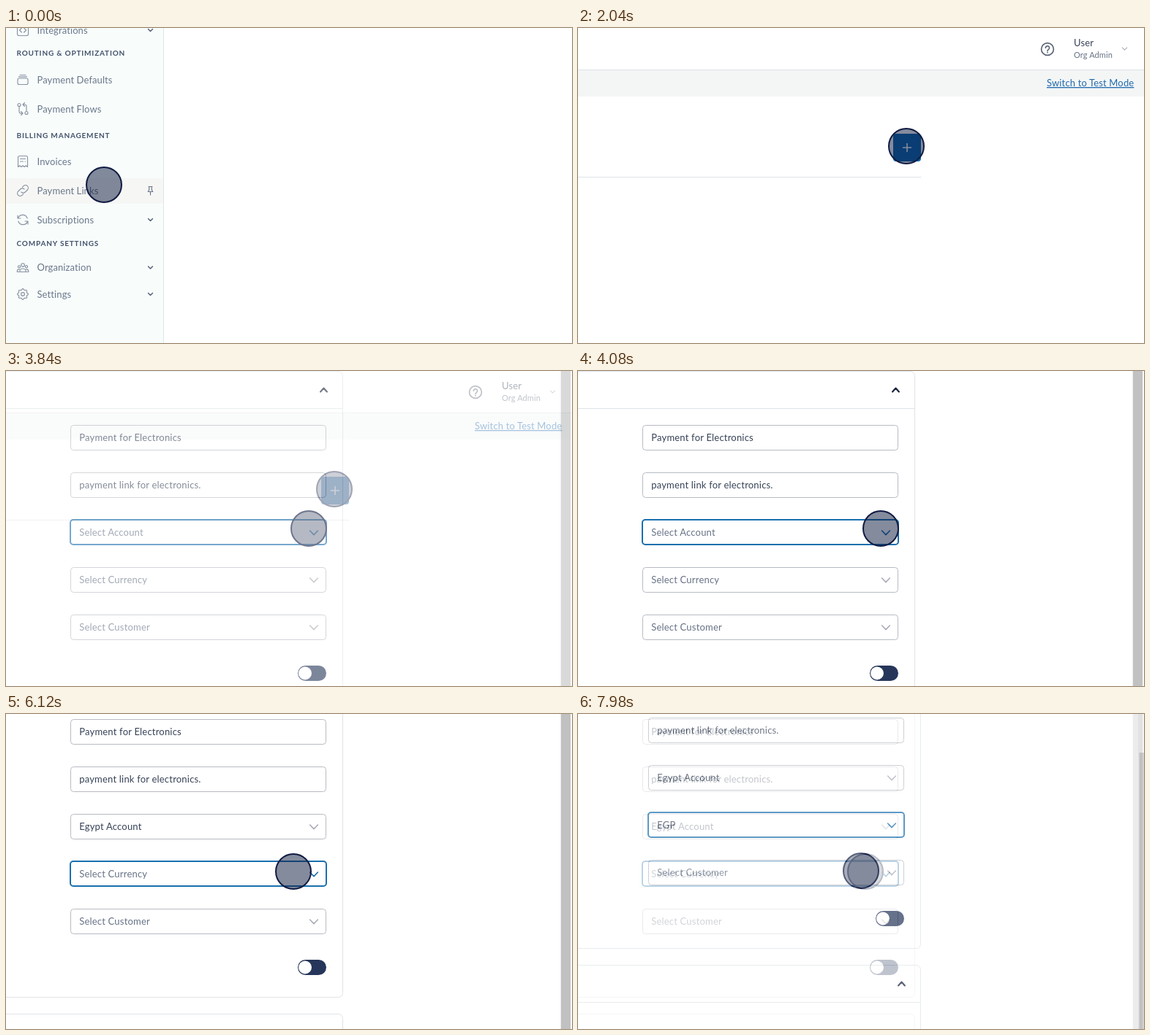
Recreate the animation shown at these times as an HTML page. Size 774x432 px, loop 8000 ms.

```html
<!DOCTYPE html>
<html lang="en">
<head>
<meta charset="utf-8">
<title>Payment link setup</title>
<style>
  html, body { margin: 0; width: 100%; height: 100%; overflow: hidden; background: #fff; }
  svg { display: block; width: 774px; height: 432px; }
  text { font: 13px Lato, "Open Sans", sans-serif; letter-spacing: .2px; fill: #667286; }
  .nav { letter-spacing: .1px; fill: #6b778a; }
  .head { font-size: 10px; font-weight: 700; letter-spacing: .82px; fill: #42516a; }
  .dark { fill: #364257; }
  .small { font-size: 11px; letter-spacing: .1px; }
  .link { fill: #1f69ad; letter-spacing: .15px; text-decoration: underline; text-underline-offset: 2px; }
  .line { fill: none; stroke-linecap: round; stroke-linejoin: round; }
</style>
</head>
<body>
<svg id="stage" viewBox="0 0 774 432"></svg>
<script>
const LOOP = 8000, STEP = 60, FADES = [1500, 3540, 5580, 7620];
const BLUE = '#1a6fae', EDGE = '#dfe3e7';

const rect = (x, y, w, h, fill, rx = 0, extra = '') =>
  `<rect x="${x}" y="${y}" width="${w}" height="${h}" fill="${fill}" rx="${rx}" ${extra}/>`;
const line = (d, color, width = 1) =>
  `<path class="line" d="${d}" stroke="${color}" stroke-width="${width}"/>`;
const text = (x, y, cls, str) => `<text x="${x}" y="${y}" class="${cls}">${str}</text>`;
const chevron = (x, y, w, h, color, width) =>
  line(`M${x - w} ${y - h / 2}l${w} ${h}l${w} ${-h}`, color, width);
const ring = (x, y, r) => `M${x - r} ${y}a${r} ${r} 0 1 0 ${2 * r} 0a${r} ${r} 0 1 0 ${-2 * r} 0`;
const pointer = (x, y) =>
  `<circle cx="${x}" cy="${y}" r="24" fill="rgb(11,25,60)" fill-opacity=".5" stroke="#101b42" stroke-width="2"/>`;

function gear(r, bump) {
  let d = '';
  for (let i = 0; i < 64; i++) {
    const a = i * Math.PI / 32, q = r + bump * Math.cos(8 * a);
    d += `${i ? 'L' : 'M'}${(q * Math.cos(a)).toFixed(2)} ${(q * Math.sin(a)).toFixed(2)}`;
  }
  return d + 'Z' + ring(0, 0, 2.4);
}

// Icon paths are centred on 0,0.
const ICONS = {
  code: 'M-5 -7.5h10q2.5 0 2.5 2.5v10q0 2.5 -2.5 2.5h-10q-2.5 0 -2.5 -2.5v-10q0 -2.5 2.5 -2.5M-1.5 -3l-3 3l3 3M1.5 -3l3 3l-3 3',
  stack: 'M-5 -2h10q2 0 2 2v4.5q0 2 -2 2h-10q-2 0 -2 -2v-4.5q0 -2 2 -2M-5.5 -4.2h11M-4 -6.5h8',
  flow: ring(-5, -5.5, 2) + ring(5, 5.5, 2) +
    'M-5 -3v6.5q0 2.5 2.5 2.5h2.5M-2.5 3.5l2.5 2.5l-2.5 2.5M5 3v-6.5q0 -2.5 -2.5 -2.5h-2.5M2.5 -3.5l-2.5 -2.5l2.5 -2.5',
  bill: 'M-6.5 7.5v-13q0 -2 2 -2h9q2 0 2 2v13l-2.2 -1.7l-2.2 1.7l-2.1 -1.7l-2.1 1.7l-2.2 -1.7zM-3.5 -3.5h7M-3.5 0h4M3 0h.5',
  chain: 'M-2 2a3.7 3.7 0 0 0 5.3 0l3 -3a3.7 3.7 0 0 0 -5.3 -5.3l-1.5 1.5M2 -2a3.7 3.7 0 0 0 -5.3 0l-3 3a3.7 3.7 0 0 0 5.3 5.3l1.5 -1.5',
  cycle: 'M-7 -6v4h4M-6.5 -2.2a6.7 6.7 0 0 1 12.7 .2M7 6v-4h-4M6.5 2.2a6.7 6.7 0 0 1 -12.7 -.2',
  people: ring(0, -3.5, 2.3) + ring(-5, -1.2, 1.6) + ring(5, -1.2, 1.6) +
    'M-4 6v-1.5q0 -3 4 -3t4 3v1.5zM-4.5 6h-3.2v-1q0 -2.6 3 -2.6M4.5 6h3.2v-1q0 -2.6 -3 -2.6',
  gear: gear(6.6, .8),
  pin: 'M-2.5 -5.5h5M-1.8 -5.5v4.5l-1.5 2.5h6.6l-1.5 -2.5v-4.5M0 1.5v4.5'
};
const icon = (name, x, y, color = '#8a93a2') =>
  `<g transform="translate(${x} ${y})">${line(ICONS[name], color, 1.15)}</g>`;

function sidebar() {
  const items = [
    ['Integrations', 'code', 3, true], ['Payment Defaults', 'stack', 71], ['Payment Flows', 'flow', 111],
    ['Invoices', 'bill', 183], ['Payment Links', 'chain', 223], ['Subscriptions', 'cycle', 263, true],
    ['Organization', 'people', 328.5, true], ['Settings', 'gear', 365, true]
  ];
  const heads = [['ROUTING &amp; OPTIMIZATION', 38.3], ['BILLING MANAGEMENT', 150.5], ['COMPANY SETTINGS', 299]];
  return rect(0, 0, 215, 432, '#f8fdfc') + rect(0, 206, 215, 35, '#f6f7f5') +
    line('M215.5 0V432', '#dde6e8') +
    heads.map(([s, y]) => text(14.5, y, 'head', s)).join('') +
    items.map(([s, name, y, more]) => icon(name, 23, y) + text(42.5, y + 4.5, 'nav', s) +
      (more ? chevron(197.5, y, 3, 3.2, '#566276', 1.4) : '')).join('') +
    icon('pin', 197.5, 223, '#6b768a') + pointer(134, 215);
}

function header() {
  return rect(0, 58, 774, 36, '#f4f6f6') + line('M0 57.5H774', EDGE) + line('M0 204.5H469', EDGE) +
    line(ring(642, 29, 8.4), '#5d6677', 1.7) +
    line('M639.4 27.2a2.6 2.6 0 1 1 4 2.2q-1.4 .8 -1.4 2M642 33.6v.1', '#5d6677', 1.7) +
    text(678, 25, 'dark', 'User') + text(678, 41.3, 'small', 'Org Admin') +
    chevron(747.5, 28.5, 3.2, 3.4, '#a9afb9', 1.1) + text(641, 80, 'link', 'Switch to Test Mode') +
    rect(431, 145, 38, 38, '#0a62ac', 4) + line('M444.5 164h11M450 158.5v11', '#fff', 1.6) +
    pointer(449, 162);
}

function panel(top, height) {
  return rect(-20, top, 480.5, height, 'none', 6, `stroke="${EDGE}"`) +
    line(`M-20 ${top + 51}H460.5`, EDGE) + chevron(434.5, top + 25.5, 4.4, -4.8, '#18233c', 2.2);
}

function field(i, label, filled, focus) {
  const y = 74.5 + 65 * i;
  const box = focus
    ? rect(88, y - .5, 350, 34, '#fff', 4, `stroke="${BLUE}" stroke-width="2"`)
    : rect(88.5, y, 349, 34, '#fff', 4, 'stroke="#b7bbc3"');
  return box + text(100.2, y + 21.3, filled ? 'dark' : '', label) +
    (i > 1 ? chevron(421, y + 17.3, 5.4, 5.6, focus ? BLUE : '#a9adb6', 1.6) : '');
}

function form(dx, dy, focus, account, currency, px, py, barX, thumbY) {
  const rows = [
    ['Payment for Electronics', true], ['payment link for electronics.', true],
    [account || 'Select Account', account], [currency || 'Select Currency', currency], ['Select Customer', false]
  ];
  return `<g transform="translate(${dx} ${dy})">` + panel(.5, 455) + panel(478.5, 400) +
    rows.map(([s, filled], i) => field(i, s, filled, i === focus)).join('') +
    rect(399, 404, 39, 21, '#26365a', 10.5) + '<circle cx="409" cy="414.5" r="9" fill="#fff"/></g>' +
    rect(barX, 0, 15, 432, '#f1f1f1') + rect(barX + 1.5, thumbY, 13, 432, '#c1c1c1') + pointer(px, py);
}

const scenes = [
  sidebar(),
  header(),
  form(0, 0, 2, '', '', 414, 216, 757.5, 0),
  form(0, -67, 3, 'Egypt Account', '', 393, 216, 757.5, 0),
  form(8, -134, 3, 'Egypt Account', 'EGP', 387, 215, 766, 53)
];
const stage = document.getElementById('stage');
stage.innerHTML = scenes.map(s => `<g>${rect(0, 0, 774, 432, '#fff')}${s}</g>`).join('');
const layers = [...stage.children];

function draw() {
  const t = performance.now() % LOOP;
  FADES.forEach((start, i) => {
    const step = Math.floor((t - start) / STEP) + 1;
    const alpha = Math.min(10, Math.max(0, step)) / 10;
    layers[i + 1].style.opacity = alpha;
    layers[i + 1].style.display = alpha ? '' : 'none';
  });
  requestAnimationFrame(draw);
}
draw();
</script>
</body>
</html>
```
